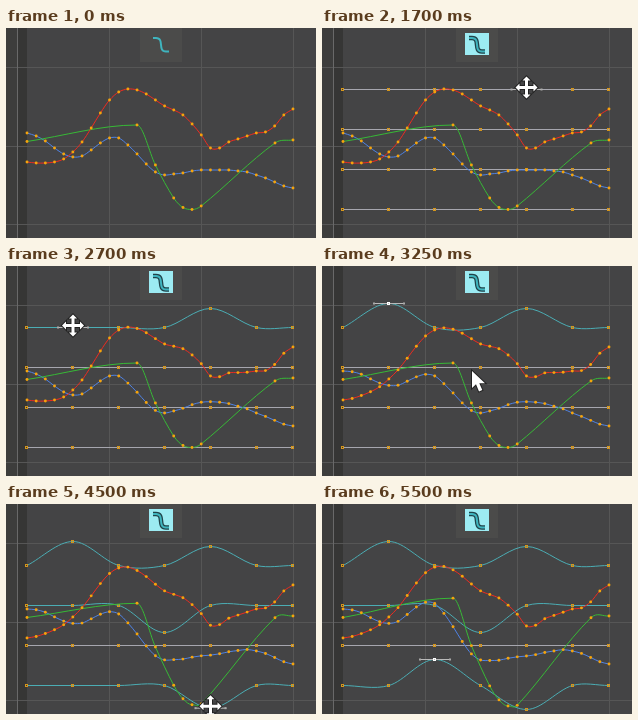
Animation of 310x210 px, one loop 5550 ms. Source, as an HTML page with a canvas:

```html
<!DOCTYPE html>
<html>
<head>
<meta charset="utf-8">
<style>
html, body { margin: 0; width: 310px; height: 210px; overflow: hidden; background: #444; }
canvas { display: block; }
</style>
</head>
<body>
<canvas id="stage" width="310" height="210"></canvas>
<script>
const ctx = document.getElementById('stage').getContext('2d');
const LOOP = 5550;
const rowY = [61.5, 101.5, 141.5, 181.5];
const keyX = [21, 67, 113, 158.5, 204.5, 250.5, 287];
const denseX = Array.from({ length: 30 }, (_, i) => 21 + i * 266 / 29);
const red = [134, 135, 135, 134, 131, 124, 114, 100, 85, 72, 64, 61, 62, 66, 72, 78, 82, 87, 96, 107,
  120, 120, 114, 111, 108, 105, 104, 98, 87, 81];
const blue = [105, 108, 113, 120, 126, 129, 128, 122, 115, 110, 110, 117, 126, 136, 144, 147, 146, 145,
  143, 142, 142, 142, 142, 143, 144, 147, 150, 154, 158, 160];
const greenX = [21, 131, 149.4, 167.7, 177, 186, 195.2, 269, 287];
const green = [113.5, 97, 137, 170, 179.5, 181.5, 178, 115, 112];

// Key drags: row, key, distance, start, end, arrow arrival point, pull on each curve
const drags = [
  { row: 0, key: 4, dy: -19, t0: 1730, t1: 2050, at: [202, 62], red: .53, blue: .33, green: 0 },
  { row: 0, key: 1, dy: -24, t0: 2730, t1: 3000, at: [67, 59], red: .46, blue: .4, green: 0 },
  { row: 1, key: 3, dy: 27, t0: 3350, t1: 3700, at: [150, 105], red: .33, blue: .33, green: .3 },
  { row: 3, key: 4, dy: 24, t0: 4200, t1: 4550, at: [208, 184], red: .5, blue: .68, green: 1 },
  { row: 3, key: 2, dy: -26, t0: 5050, t1: 5400, at: [111, 180], red: .03, blue: .4, green: .28 }
];

const ease = (t, a, b) => {
  const u = Math.min(1, Math.max(0, (t - a) / (b - a)));
  return u * u * (3 - 2 * u);
};
const moved = (d, t) => d.dy * ease(t, d.t0, d.t1);

function slopes(xs, ys, flatPeaks) {
  const n = xs.length - 1;
  return xs.map((x, i) => {
    const a = Math.max(0, i - 1), b = Math.min(n, i + 1);
    if (flatPeaks && i > 0 && i < n && (ys[i] - ys[a]) * (ys[b] - ys[i]) <= 0) return 0;
    return (ys[b] - ys[a]) / (xs[b] - xs[a]);
  });
}

function curve(xs, ys, color, flatPeaks) {
  const m = slopes(xs, ys, flatPeaks);
  ctx.beginPath();
  ctx.moveTo(xs[0], ys[0]);
  for (let i = 1; i < xs.length; i++) {
    const h = (xs[i] - xs[i - 1]) / 3;
    ctx.bezierCurveTo(xs[i - 1] + h, ys[i - 1] + m[i - 1] * h, xs[i] - h, ys[i] - m[i] * h, xs[i], ys[i]);
  }
  ctx.strokeStyle = color;
  ctx.lineWidth = 1;
  ctx.stroke();
}

// Height at x of a row curve with a single key raised by one
function bump(key, x) {
  const ys = keyX.map((_, i) => +(i === key));
  const m = slopes(keyX, ys);
  let i = 0;
  while (i < keyX.length - 2 && x > keyX[i + 1]) i++;
  const h = keyX[i + 1] - keyX[i], u = (x - keyX[i]) / h, v = 1 - u;
  return ys[i] * v * v * (1 + 2 * u) + ys[i + 1] * u * u * (3 - 2 * u)
    + h * u * v * (m[i] * v - m[i + 1] * u);
}

const pulled = (xs, ys, name, t) => ys.map((y, i) =>
  drags.reduce((sum, d) => sum + d[name] * moved(d, t) * bump(d.key, xs[i]), y));

function dots(xs, ys) {
  ctx.fillStyle = '#f5a40c';
  xs.forEach((x, i) => {
    ctx.beginPath();
    ctx.arc(x, ys[i], 1.45, 0, 7);
    ctx.fill();
  });
}

function rect(color, x, y, w, h) {
  ctx.fillStyle = color;
  ctx.fillRect(x, y, w, h);
}

function backdrop() {
  rect('#444445', 0, 0, 310, 210);
  rect('#3d3d3c', 0, 0, 11, 210);
  rect('#363635', 12, 0, 9, 210);
  for (const y of [39, 118, 196]) rect('#565656', 0, y, 310, 1);
  for (const x of [103, 195, 287]) rect('#565656', x, 0, 1, 210);
  rect('#696969', 11, 0, 1, 210);
}

const icon = new Path2D('M147 10h3C159 10 151 23.5 160 23.5h3');
function button(on) {
  rect('#4b4b4a', 134, 0, 42, 34);
  if (on) {
    rect('#9cebf2', 143, 5, 24, 22);
    ctx.strokeStyle = '#20434a';
    ctx.lineWidth = 4.5;
    ctx.stroke(icon);
  }
  ctx.strokeStyle = '#3fb4be';
  ctx.lineWidth = 2;
  ctx.stroke(icon);
}

function rows(t) {
  const picked = drags.filter(d => t >= d.t0 - 40).pop();
  rowY.forEach((y, r) => {
    const ys = keyX.map((_, k) =>
      drags.reduce((sum, d) => d.row === r && d.key === k ? sum + moved(d, t) : sum, y));
    const edited = drags.some(d => d.row === r && t > d.t0);
    curve(keyX, ys, edited ? '#4badb4' : t < 1200 ? '#d0d0d0' : '#a6a6ae');
    keyX.forEach((x, k) => {
      const sel = picked && picked.row === r && picked.key === k;
      if (sel) {
        rect('#b9b9b9', x - 15, ys[k] - .5, 31, 1);
        for (const dx of [-15, 15]) rect('#aaa', x + dx - 1, ys[k] - 1, 2, 2);
      }
      ctx.strokeStyle = sel ? '#fff' : '#d5961c';
      ctx.lineWidth = 1;
      ctx.strokeRect(Math.round(x) - 1.5, Math.round(ys[k] - .5) - .5, 2, 2);
    });
  });
}

const arrow = new Path2D('M0 0V17L4 13.3L7 20.5L10.3 19L7.3 12.2H13Z');
const cross = new Path2D('M0-11L4-7H1.5V-1.5H7V-4L11 0L7 4V1.5H1.5V7H4L0 11L-4 7H-1.5V1.5H-7V4L-11 0L-7-4V-1.5H-1.5V-7H-4Z');
function pointer(shape, x, y) {
  ctx.save();
  ctx.translate(x, y);
  ctx.strokeStyle = '#222';
  ctx.lineWidth = 2;
  ctx.stroke(shape);
  ctx.fillStyle = '#fff';
  ctx.fill(shape);
  ctx.restore();
}

function cursor(t) {
  if (t < 100 || t >= 5450) return;
  // Travel legs: start, end, from, to
  const legs = [[100, 500, [202, 92], [156, 15]]];
  drags.forEach((d, i) => {
    const p = drags[i - 1];
    const from = p ? [keyX[p.key], rowY[p.row] + p.dy] : [156, 15];
    legs.push([p ? p.t1 : 1200, d.t0 - 100, from, d.at]);
  });
  const held = drags.find(d => t >= d.t0 - 30 && t <= d.t1);
  if (held) return pointer(cross, keyX[held.key], rowY[held.row] + moved(held, t) - 2);
  const [a, b, from, to] = legs.filter(l => t >= l[0]).pop();
  const u = ease(t, a, b);
  pointer(arrow, from[0] + (to[0] - from[0]) * u, from[1] + (to[1] - from[1]) * u);
}

function draw(now) {
  const t = Math.floor(now % LOOP / 50) * 50;
  backdrop();
  button(t >= 550);
  if (t >= 600 && (t < 750 || t >= 950)) rows(t);
  const r = pulled(denseX, red, 'red', t);
  const b = pulled(denseX, blue, 'blue', t);
  const g = pulled(greenX, green, 'green', t);
  curve(denseX, b, '#4f83e6');
  curve(greenX, g, '#37b936', true);
  curve(denseX, r, '#ee2b20');
  dots(denseX, b);
  dots(greenX, g);
  dots(denseX, r);
  cursor(t);
}

const start = performance.now();
function frame() {
  draw(performance.now() - start);
  requestAnimationFrame(frame);
}
frame();
</script>
</body>
</html>
```
